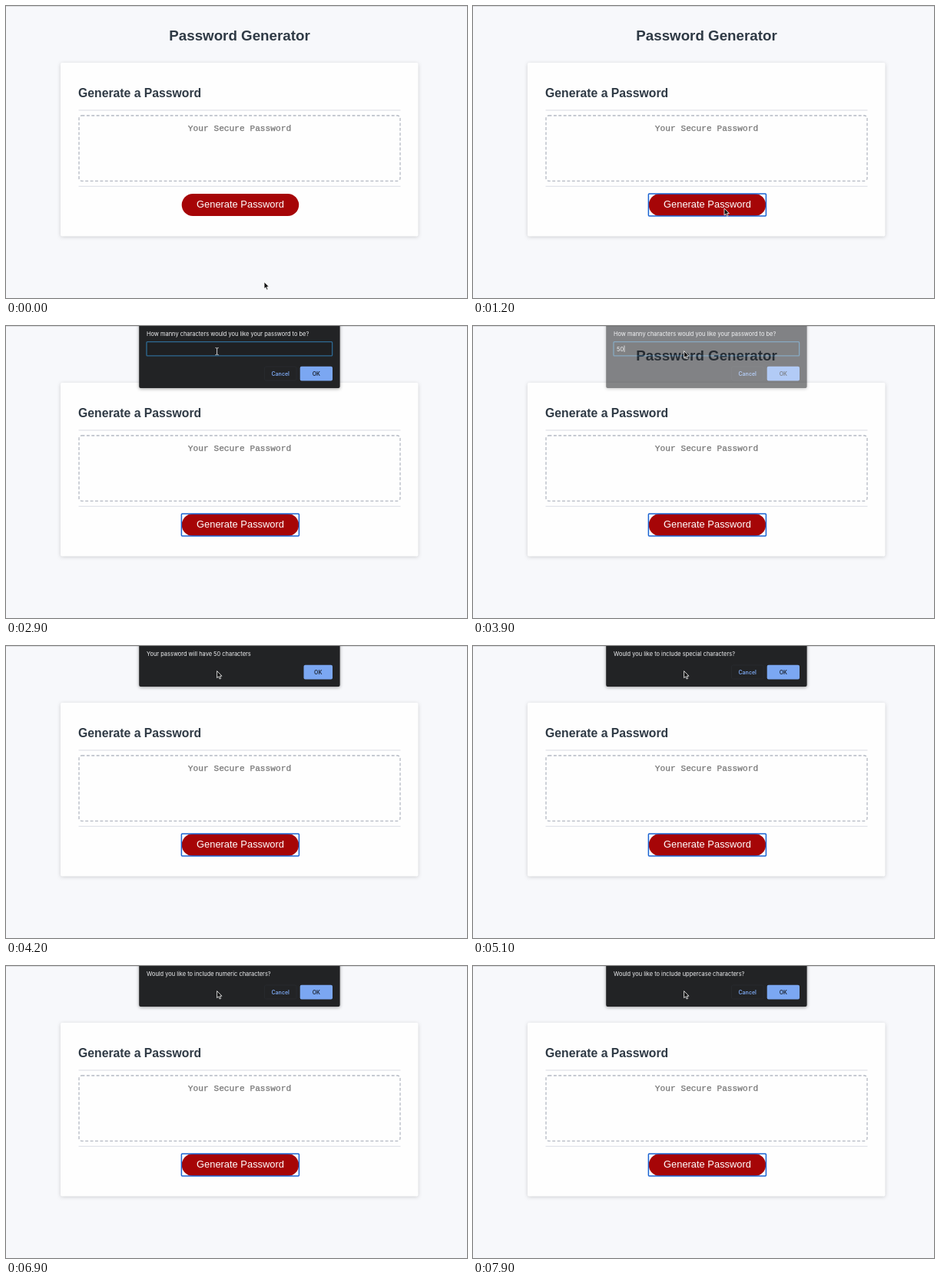
Animation, 600 px wide and 381 px high, one loop 8000 ms. Source, as an HTML page:

```html
<!DOCTYPE html>
<html lang="en">
<head>
<meta charset="utf-8">
<title>Password Generator</title>
<style>
  html, body { margin: 0; width: 100%; height: 100%; overflow: hidden; background: #f7f8fb; }
  svg { display: block; width: 600px; height: 381px; }
  .page { font-family: "Liberation Sans", Arial, sans-serif; fill: #2f3a45; }
  .mono { font: 11.2px "Liberation Mono", "Courier New", monospace; fill: #757575; stroke: #757575; stroke-width: .25; }
  .ui { font: 7.45px Inter, Roboto, sans-serif; fill: #f0f1f3; }
  .ui .btn { font-size: 7px; font-weight: 600; text-anchor: middle; }
  .card { filter: drop-shadow(0 1.3px 2.6px rgba(0,0,0,.17)); }
  .panel { filter: drop-shadow(0 1px 2.2px rgba(0,0,0,.38)); }
</style>
</head>
<body>
<svg viewBox="0 0 600 381">
  <rect width="600" height="381" fill="#f7f8fb"/>
  <rect width="600" height="1" fill="#d9dadd"/>
  <g class="page">
    <text x="304" y="45.3" font-size="18.75" font-weight="700" text-anchor="middle">Password Generator</text>
    <rect class="card" x="71" y="74" width="465.5" height="226.5" rx="2" fill="#fefefe"/>
    <text x="94" y="118.7" font-size="15.75" font-weight="700">Generate a Password</text>
    <path d="M94.5 136H513.5M94.5 235.2H513.5" stroke="#d9dce4" stroke-width="1.1"/>
    <rect x="95" y="143" width="418" height="85.3" rx="3.5" fill="none" stroke="#b4b9c3" stroke-width="1.3" stroke-dasharray="3.9 2.5"/>
    <text class="mono" x="304" y="162.6" text-anchor="middle">Your Secure Password</text>
    <rect x="228.7" y="245" width="152.5" height="29" rx="14.5" fill="#a60507"/>
    <text x="305" y="263.3" font-size="12.9" text-anchor="middle" fill="#fff">Generate Password</text>
  </g>
  <rect id="ring" x="228.4" y="245" width="153" height="29" rx="1" fill="none" stroke="#1a63d2" stroke-width="1.5"/>

  <g id="dialog" class="ui">
    <path id="panel" class="panel" fill="#222325"/>
    <text id="message" x="183" y="12.9"></text>
    <g id="field">
      <rect x="183" y="20.7" width="241.6" height="18.2" rx="1" fill="#1f2022" stroke="#2e6a94" stroke-width="1.3"/>
      <text id="typed" x="187" y="32.6"></text>
      <rect id="caret" y="25.5" width=".8" height="8.5" fill="#e8e9eb"/>
    </g>
    <g id="buttons">
      <g id="cancel">
        <rect x="336.5" y="0" width="41.5" height="18" rx="2" fill="none" stroke="#292b30" stroke-width=".8"/>
        <text class="btn" x="357.2" y="11.6" fill="#7ba6ee">Cancel</text>
      </g>
      <rect id="okBox" y="-.2" height="18.8" rx="2" fill="#7ba7f2"/>
      <text id="okText" class="btn" y="11.6" fill="#1f2736">OK</text>
    </g>
  </g>

  <path id="arrow" d="M0 0V9L2 7.2L3.5 10.4L5 9.7L3.6 6.6H6.4Z" fill="#111" stroke="#fff" stroke-width=".8" stroke-linejoin="round"/>
  <path id="beam" d="M-2 -4.6Q0 -4.6 0 -3.4Q0 -4.6 2 -4.6M0 -3.6V3.6M-2 4.6Q0 4.6 0 3.4Q0 4.6 2 4.6" fill="none" stroke="#e3e4e6" stroke-width=".9"/>
</svg>
<script>
const LOOP = 8000, STEP = 100;
const $ = id => document.getElementById(id);
const set = (id, attrs) => {
  for (const k in attrs) $(id).setAttribute(k, attrs[k]);
};
const show = (id, on) => set(id, { visibility: on ? "inherit" : "hidden" });

// Each dialog: kind, message, first and last step on screen, fading steps at both ends
const dialogs = [
  { kind: "prompt", text: "How manny characters would you like your password to be?", from: 1400, to: 3900, fadeIn: 1, fadeOut: 1 },
  { kind: "alert", text: "Your password will have 50 characters", from: 4100, to: 4900, fadeIn: 1, fadeOut: 1 },
  { kind: "confirm", text: "Would you like to include special characters?", from: 5000, to: 6100, fadeIn: 1, fadeOut: 1 },
  { kind: "confirm", text: "Would you like to include numeric characters?", from: 6300, to: 7700, fadeIn: 1, fadeOut: 0 },
  { kind: "confirm", text: "Would you like to include uppercase characters?", from: 7900, to: 7900, fadeIn: 0, fadeOut: 0 }
];

// Pointer stops: start, end, x, y
const moves = [
  [0, 0, 336, 360],
  [0, 900, 329, 266],
  [900, 1200, 327, 264],
  [1600, 2400, 278, 35],
  [2600, 2900, 274.6, 32.6]
];
const ease = p => p * p * (3 - 2 * p);

function pointer(t) {
  let [, , x, y] = moves[0];
  for (const [a, b, nx, ny] of moves.slice(1)) {
    const p = ease(Math.min(1, Math.max(0, (t - a) / (b - a))));
    x += (nx - x) * p;
    y += (ny - y) * p;
  }
  return [x, y];
}

function opacity(d, t) {
  const entering = d.fadeIn && t === d.from;
  const leaving = d.fadeOut && t === d.to;
  return entering || leaving ? 0.55 : 1;
}

function drawDialog(d, t) {
  show("dialog", !!d);
  if (!d) return;
  const prompt = d.kind === "prompt", alert = d.kind === "alert";
  const bottom = prompt ? 81 : 53;
  set("dialog", { opacity: opacity(d, t) });
  set("panel", { d: `M173.2 -4H434.6V${bottom - 2}q0 2 -2 2H175.2q-2 0 -2 -2Z` });
  $("message").textContent = d.text;
  show("field", prompt);
  show("cancel", !alert);
  set("buttons", { transform: `translate(0 ${prompt ? 53 : 25})` });
  set("okBox", { x: alert ? 387.5 : 382.7, width: alert ? 37.5 : 42.3 });
  set("okText", { x: alert ? 406.2 : 403.8 });
  if (prompt) {
    const typed = t < 3400 ? "" : t < 3600 ? "5" : "50";
    $("typed").textContent = typed;
    set("caret", { x: 187.2 + typed.length * 4.7 });
    show("caret", typed || Math.floor((t - 1400) / 500) % 2 === 0);
  }
}

function draw(ms) {
  const t = Math.floor((ms % LOOP) / STEP) * STEP;
  const d = dialogs.find(d => t >= d.from && t <= d.to);
  const [x, y] = pointer(t);
  const inField = d && d.kind === "prompt" && t < d.to && y > 20 && y < 39;
  show("ring", t >= 1100);
  drawDialog(d, t);
  show("arrow", !inField);
  show("beam", inField);
  set("arrow", { transform: `translate(${x} ${y})` });
  set("beam", { transform: `translate(${x} ${y + .4})` });
}

const start = performance.now();
function tick() {
  draw(performance.now() - start);
  requestAnimationFrame(tick);
}
tick();
</script>
</body>
</html>
```
